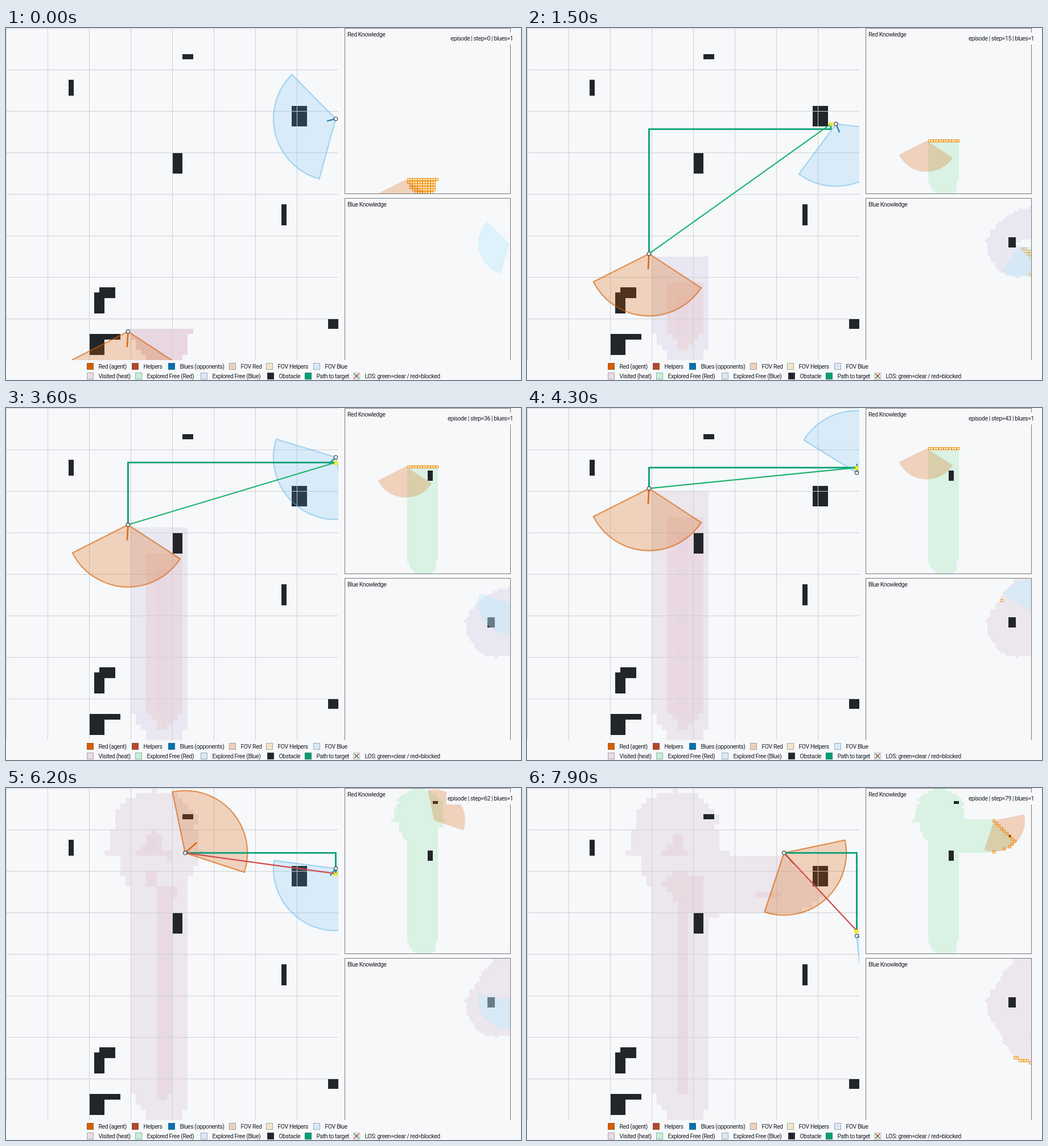
Recreate the animation shown at these times as an HTML page with a canvas. Size 905x619 px, loop 8 s.

```html
<!DOCTYPE html>
<html lang="en">
<head>
<meta charset="utf-8">
<title>Grid pursuit</title>
<style>
html, body { margin: 0; width: 905px; height: 619px; overflow: hidden; background: #f6f8fa; }
canvas { display: block; }
</style>
</head>
<body>
<canvas id="stage" width="905" height="619"></canvas>
<script>
const ctx = document.getElementById('stage').getContext('2d');
const N = 64, STEPS = 80, STEP_MS = 100, RANGE = 12;
const BG = '#f6f8fa', DARK = '#222529', PATH = '#009e73';
const MAIN = { x: 0, y: 0, size: 584 };
const RED_MAP = { x: 595.5, y: 0.5, size: 291 };
const BLUE_MAP = { x: 595.5, y: 299.5, size: 291 };
const RED_FILL = 'rgba(213,94,0,.25)', BLUE_FILL = 'rgba(86,175,238,.18)';

// col, row, width, height in cells
const OBSTACLES = [
  [34, 5, 2, 1], [12, 10, 1, 3], [55, 15, 3, 4], [32, 24, 2, 4], [53, 34, 1, 4],
  [18, 50, 3, 2], [17, 51, 2, 4], [16, 59, 6, 1], [16, 59, 3, 4], [62, 56, 2, 2]
];
const blocked = (c, r) =>
  OBSTACLES.some(([x, y, w, h]) => c >= x && c < x + w && r >= y && r < y + h);

// step, col, row
const BLUE_ROUTE = [
  [0, 63, 17], [2, 63, 15], [3, 63, 15], [4, 63, 16], [9, 58, 16], [12, 58, 18],
  [14, 58, 18], [15, 59, 18], [18, 62, 18], [22, 62, 18], [23, 62, 17], [24, 63, 17],
  [26, 63, 17], [35, 63, 10], [36, 63, 9], [38, 63, 9], [44, 63, 12], [46, 63, 12],
  [48, 63, 13], [51, 63, 13], [56, 63, 16], [61, 63, 16], [62, 63, 15], [63, 63, 15],
  [78, 63, 27], [79, 63, 28]
];
// step, unwrapped heading in degrees
const BLUE_TURNS = [[0, 165.3], [15, 426.5], [23, 525.8], [36, 857], [51, 1145.8], [62, 1207.4], [79, 1464.2]];

function along(keys, s, field) {
  let i = 1;
  while (i < keys.length - 1 && keys[i][0] < s) i++;
  const a = keys[i - 1], b = keys[i];
  return a[field] + (b[field] - a[field]) * (s - a[0]) / (b[0] - a[0]);
}

function redAt(s) {
  const turns = Math.min(7, Math.max(0, Math.floor((s - 45) / 3)));
  return { c: 23 + Math.max(0, s - 46) - turns, r: Math.max(12, 58 - s), dir: 93.2 + 45 * turns };
}

function blueAt(s) {
  return {
    c: Math.round(along(BLUE_ROUTE, s, 1)),
    r: Math.round(along(BLUE_ROUTE, s, 2)),
    dir: along(BLUE_TURNS, s, 1)
  };
}

// The sensor measures angles from the row axis, 30 degrees behind the drawn cone.
function senses(a, c, r) {
  const dx = c - a.c, dy = r - a.r;
  if (dx * dx + dy * dy > RANGE * RANGE) return false;
  const off = Math.atan2(dx, dy) * 180 / Math.PI - (a.dir - 30);
  return Math.abs(off - 360 * Math.round(off / 360)) <= 30;
}

function observe(poseAt) {
  const counts = new Uint8Array(N * N), log = [];
  for (let s = 0; s < STEPS; s++) {
    const pose = poseAt(s), fresh = new Set();
    for (let r = 0; r < N; r++) for (let c = 0; c < N; c++) {
      const i = r * N + c;
      if (senses(pose, c, r) && ++counts[i] === 1) fresh.add(i);
    }
    log.push({ pose, fresh, counts: counts.slice() });
  }
  return log;
}
const redLog = observe(redAt), blueLog = observe(blueAt);

function cell(map, c, r, color, w = 1, h = 1) {
  const k = map.size / N;
  const x = Math.round(map.x + c * k), y = Math.round(map.y + r * k);
  ctx.fillStyle = color;
  ctx.fillRect(x, y, Math.round(map.x + (c + w) * k) - x, Math.round(map.y + (r + h) * k) - y);
}

function center(map, a) {
  const k = map.size / N;
  return [map.x + (a.c + .5) * k, map.y + (a.r + .5) * k];
}

function cone(map, a, fill, stroke) {
  const [x, y] = center(map, a), rad = Math.PI / 180;
  ctx.beginPath();
  ctx.moveTo(x, y);
  ctx.arc(x, y, RANGE * map.size / N, (a.dir - 60) * rad, (a.dir + 60) * rad);
  ctx.closePath();
  ctx.fillStyle = fill;
  ctx.fill();
  if (stroke) {
    ctx.strokeStyle = stroke;
    ctx.lineWidth = 2.2;
    ctx.stroke();
  }
}

function line(points, color, width) {
  ctx.beginPath();
  points.forEach(([x, y]) => ctx.lineTo(x, y));
  ctx.strokeStyle = color;
  ctx.lineWidth = width;
  ctx.stroke();
}

function label(text, x, y, align = 'left') {
  ctx.font = '10.5px Roboto, "Open Sans", sans-serif';
  ctx.letterSpacing = '-0.45px';
  ctx.textAlign = align;
  ctx.textBaseline = 'alphabetic';
  ctx.fillStyle = '#1c1e21';
  ctx.fillText(text, x, y);
}

function clipTo(x, y, w, h, draw) {
  ctx.save();
  ctx.beginPath();
  ctx.rect(x, y, w, h);
  ctx.clip();
  draw();
  ctx.restore();
}

function heading(a, length, color, width) {
  const [x, y] = center(MAIN, a), t = a.dir * Math.PI / 180;
  line([[x, y], [x + length * Math.cos(t), y + length * Math.sin(t)]], color, width);
}

function marker(a) {
  const [x, y] = center(MAIN, a);
  ctx.beginPath();
  ctx.arc(x, y, 3.2, 0, 7);
  ctx.fillStyle = 'rgba(246,248,250,.85)';
  ctx.fill();
  ctx.strokeStyle = '#3a3d40';
  ctx.lineWidth = 1.1;
  ctx.stroke();
}

function route(from, to) {
  const pts = [from];
  const add = (c, r) => pts.push({ c, r });
  if (to.r >= from.r) add(to.c, from.r);
  else if (to.r >= 15 && to.r <= 18) {
    add(from.c, 19);
    add(58, 19);
    add(58, to.r);
  } else add(from.c, to.r);
  pts.push(to);
  return pts.map(p => center(MAIN, p));
}

function clearSight(a, b) {
  const n = Math.max(Math.abs(b.c - a.c), Math.abs(b.r - a.r));
  for (let i = 1; i < n; i++) {
    const c = Math.round(a.c + (b.c - a.c) * i / n), r = Math.round(a.r + (b.r - a.r) * i / n);
    if (blocked(c, r)) return false;
  }
  return true;
}

const seenTone = s => s < 40 ? '#e9e7f1' : '#ece6ed';

function drawHeat(s) {
  const { counts } = redLog[s], max = Math.max(...counts);
  counts.forEach((n, i) => {
    if (!n || (n === 1 && max > 6)) return;
    const v = n / max;
    const tone = v >= .95 ? '#e8d7e0' : v >= .7 ? '#e9dae2' : seenTone(s);
    cell(MAIN, i % N, Math.floor(i / N), tone);
  });
}

function drawMain(s) {
  const red = redLog[s].pose, blue = blueLog[s].pose;
  drawHeat(s);
  OBSTACLES.forEach(([c, r, w, h]) => cell(MAIN, c, r, DARK, w, h));
  ctx.fillStyle = '#ced0d3';
  for (let p = 0; p < 584; p += 73) {
    ctx.fillRect(p, 0, 1, 584);
    ctx.fillRect(0, p, 584, 1);
  }
  cone(MAIN, red, RED_FILL, 'rgba(213,94,0,.62)');
  cone(MAIN, blue, BLUE_FILL, 'rgba(86,180,233,.48)');
  heading(red, 27.4, '#d9691a', 2.6);
  heading(blue, 16, '#1f7fb8', 2.2);
  if (s > 0) {
    const target = blueLog[s - 1].pose, [tx, ty] = center(MAIN, target);
    ctx.fillStyle = '#f4e73a';
    ctx.fillRect(Math.round(tx) - 4, Math.round(ty) - 3, 8, 7);
    line(route(red, target), PATH, 2.8);
    line([center(MAIN, red), [tx, ty]], clearSight(red, target) ? '#1fb36e' : '#d04a4a', 2.2);
    ctx.fillStyle = '#f4e73a';
    ctx.fillRect(Math.round(tx) - 2, Math.round(ty) - 2, 5, 5);
  }
  marker(red);
  marker(blue);
}

function drawMap(map, entry, tone, fill, title) {
  const k = map.size / N;
  clipTo(map.x, map.y, map.size, map.size, () => {
    entry.counts.forEach((n, i) => {
      if (!n) return;
      const c = i % N, r = Math.floor(i / N), wall = blocked(c, r), fresh = entry.fresh.has(i);
      cell(map, c, r, wall ? DARK : fresh ? '#fdf6ea' : tone);
    });
    ctx.strokeStyle = '#f39a1f';
    ctx.lineWidth = 1.2;
    entry.fresh.forEach(i => {
      const x = Math.round(map.x + i % N * k), y = Math.round(map.y + Math.floor(i / N) * k);
      ctx.strokeRect(x + .5, y + .5, 4, 4);
    });
    cone(map, entry.pose, fill);
  });
  ctx.strokeStyle = '#77797c';
  ctx.lineWidth = 1;
  ctx.strokeRect(map.x, map.y, map.size, map.size);
  label(title, map.x + 4.5, map.y + 14);
}

const LEGEND = [
  [142, 589, '#d55e00', 'Red (agent)'], [221, 589, '#b7472a', 'Helpers'],
  [285, 589, '#0072b2', 'Blues (opponents)'], [392, 589, '#edd1bc', 'FOV Red'],
  [457, 589, '#f0e5c6', 'FOV Helpers'], [540, 589, '#d9e9f7', 'FOV Blue'],
  [142, 606, '#e9dbe4', 'Visited (heat)'], [227, 606, '#c6efd6', 'Explored Free (Red)'],
  [342, 606, '#dae8f6', 'Explored Free (Blue)'], [459, 606, DARK, 'Obstacle'],
  [525, 606, PATH, 'Path to target'], [610, 606, '#ffffff', 'LOS: green=clear / red=blocked']
];

function drawLegend() {
  ctx.fillStyle = BG;
  ctx.fillRect(0, 584, 905, 35);
  LEGEND.forEach(([x, y, color, text]) => {
    ctx.fillStyle = color;
    ctx.fillRect(x, y, 12, 12);
    ctx.strokeStyle = 'rgba(90,95,100,.45)';
    ctx.lineWidth = 1;
    ctx.strokeRect(x + .5, y + .5, 11, 11);
    label(text, x + 20.5, y + 9.5);
  });
  line([[612, 608], [620, 616]], '#27a35f', 1.8);
  line([[612, 616], [620, 608]], '#d04a4a', 1.8);
}

function drawTitle(s) {
  const text = `episode | step=${s} | blues=1`;
  const left = s < 10 ? 780 : 774;
  ctx.fillStyle = BG;
  ctx.fillRect(left, 8, 121, 21);
  label(text, 891, 22, 'right');
}

function draw(s) {
  ctx.fillStyle = BG;
  ctx.fillRect(0, 0, 905, 619);
  clipTo(0, 0, 584, 584, () => drawMain(s));
  drawMap(RED_MAP, redLog[s], '#d9f2e3', RED_FILL, 'Red Knowledge');
  drawMap(BLUE_MAP, blueLog[s], seenTone(s), 'rgba(190,232,250,.45)', 'Blue Knowledge');
  drawLegend();
  drawTitle(s);
}

let shown = -1;
function tick() {
  const s = Math.floor(performance.now() / STEP_MS) % STEPS;
  if (s !== shown) draw(shown = s);
  requestAnimationFrame(tick);
}
tick();
</script>
</body>
</html>
```
